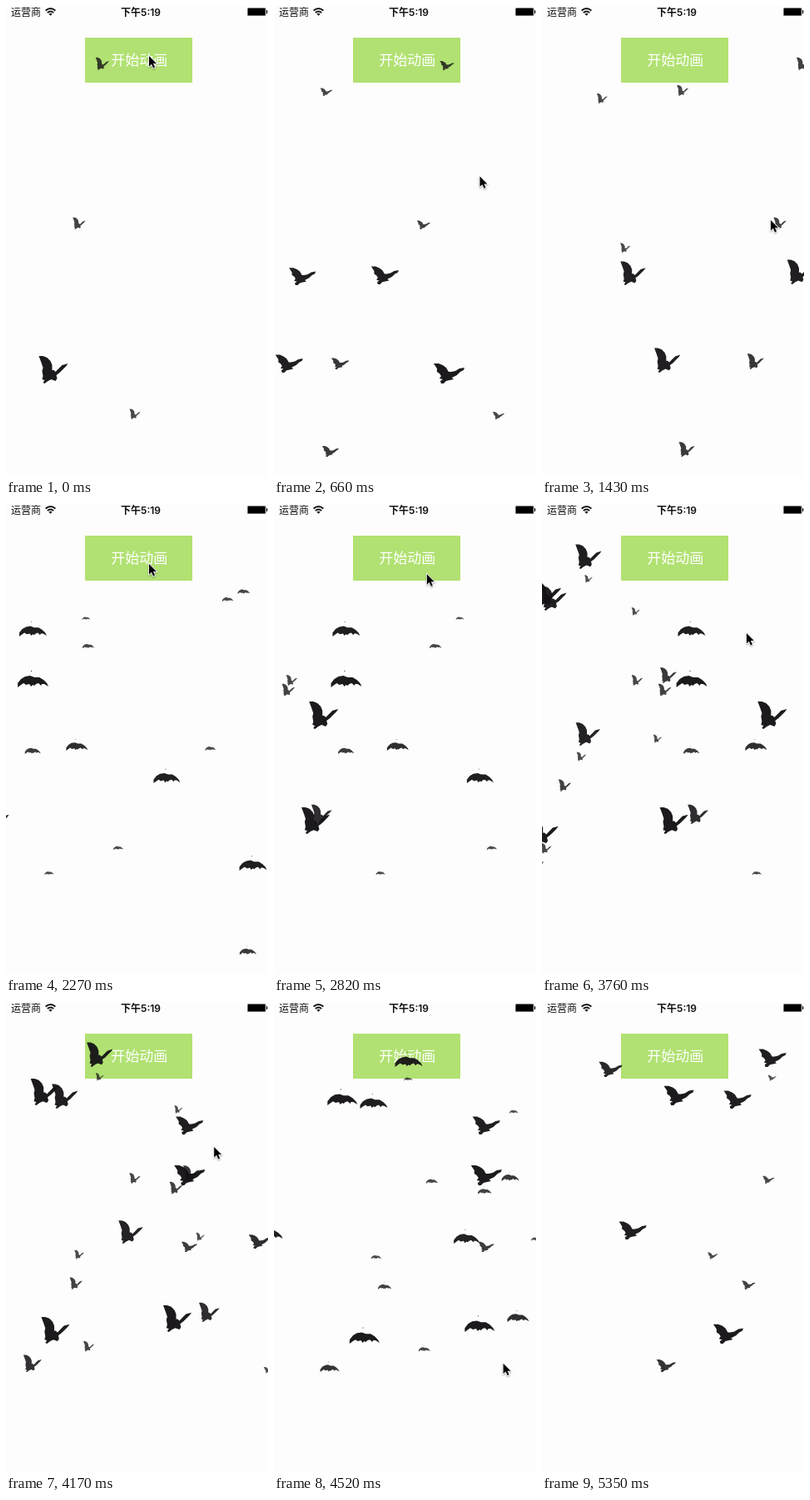
Recreate the animation shown at these times as an HTML page with a canvas. Size 315 px wide and 564 px high, loop 5.55 s.

```html
<!DOCTYPE html>
<html lang="zh">
<head>
<meta charset="utf-8">
<title>开始动画</title>
<style>
  html, body { margin: 0; width: 100%; height: 100%; overflow: hidden; background: #fdfdfd; }
  svg, canvas { position: absolute; left: 0; top: 0; width: 315px; height: 564px; }
  text { font-family: Inter, "Noto Sans CJK SC", "Noto Sans CJK", sans-serif; }
</style>
</head>
<body>
<svg viewBox="0 0 315 564">
  <text x="6" y="11.5" font-size="12" fill="#111">运营商</text>
  <g fill="none" stroke="#111" stroke-width="1.9">
    <path d="M47.6 5.4Q53.5 .6 59.4 5.4"/>
    <path d="M49.8 8Q53.5 5 57.2 8"/>
  </g>
  <path d="M51.4 9.4Q53.5 7.9 55.6 9.4L53.5 11.8Z" fill="#111"/>
  <text x="162" y="11.5" font-size="12" font-weight="600" text-anchor="middle" fill="#111">下午5:19</text>
  <rect x="290" y="2" width="22.5" height="10" rx="1.5" fill="#777"/>
  <rect x="291" y="3" width="20.5" height="8" rx=".5"/>
  <path d="M313 5h1q1 2 0 4h-1z" fill="#222"/>
  <rect x="95" y="38" width="129" height="54" fill="#b1e172"/>
  <text x="160.3" y="71.2" font-size="17" text-anchor="middle" fill="#fff">开始动画</text>
</svg>
<canvas></canvas>
<script>
const LOOP = 5550, RATE = .99 / 1000, FLAP = .495;
const TRAVEL = 350, START_X = -20, UNIT = 37;

// Wing poses in flapping order; origin is the left edge at the bottom.
const poses = [
  "M0-33L5-33 10-31 14-27 16-22 16-16 18-16 20-14 24-18 28-22 35-24 33-21 29-17 25-13 21-10 22-6 20-3 15-5 11-3 7 0 5-1 7-4 4-5 5-9 4-15 5-19 3-25Z",
  "M0-24L6-24 11-22 15-19 18-14 21-14 26-15 31-18 37-19 36-16 32-14 28-10 24-8 22-7 24-5 19-4 15-3 12 0 9 0 8-3 11-5 7-6 9-9 7-12 4-14 4-18Z",
  "M0 0L0-5 4-10 9-13 15-14 20-12 26-12 31-9 35-5 37-1 32-4 29-4 28-2 25-5 22-4 20-2 18-3 16-1 14-4 10-3 7-5 4-3ZM16-20h1v1h-1Z"
].map(d => new Path2D(d));

function seeded(seed) {
  return () => (seed = (seed * 16807) % 2147483647) / 2147483647;
}

const bat = (secs, launch, y, size) => ({ secs, launch, y, size });

// Small far-off bats, launched at random between two times.
function distant(count, from, to, seed) {
  const rnd = seeded(seed);
  const between = (a, b) => a + (b - a) * rnd();
  return Array.from({ length: count }, () =>
    bat(1.5 + Math.floor(rnd() * 5) / 2, between(from, to), between(65, 475), between(9, 17)));
}

// Crossing seconds, launch second, bottom edge, size.
const flocks = [
  { phase: .315, bats: [
    bat(2.5, -.97, 77, 17), bat(2.5, -.77, 268, 16), bat(2, -1, 496, 14),
    bat(1.5, -.33, 453, 37), bat(1.5, 0, 334, 33), bat(1.5, .23, 436, 21),
    bat(2.5, .03, 541, 20), bat(3.5, .12, 335, 32), bat(2, .44, 440, 33),
    bat(3, 1.35, 296, 26), bat(3.5, 1.73, 159, 33), bat(3.5, 1.73, 220, 37),
    bat(3.5, 1.73, 300, 19), ...distant(7, 0, 1.75, 4211)
  ] },
  { phase: .68, bats: [
    bat(3, 2.19, 396, 36), bat(2.5, 2.24, 384, 26), bat(1.5, 2.45, 270, 37),
    bat(2, 2.74, 215, 21), bat(2.5, 3.18, 78, 33), bat(1.5, 3.4, 290, 31),
    bat(3.5, 3.46, 124, 36), bat(2.5, 3.48, 128, 33), bat(2.5, 3.56, 410, 36),
    bat(3.5, 3.61, 444, 23), bat(2.5, 4.38, 285, 33), bat(2.5, 4.57, 90, 28),
    ...distant(8, 2.35, 3.7, 9173)
  ] }
];

// Pointer stops: time, x, y.
const stops = [[0, 172, 60], [1000, 275, 257], [1450, 275, 257], [2050, 172, 72], [2650, 172, 72],
  [3300, 241, 144], [4100, 249, 162], [4800, 290, 580], [LOOP, 290, 580]];
const arrow = new Path2D("M0 0V15.500L3.700 12.200 6.300 18 8.800 17 6.300 11.300H11.200Z");

const canvas = document.querySelector("canvas");
const ctx = canvas.getContext("2d");
const dpr = window.devicePixelRatio || 1;
canvas.width = 315 * dpr;
canvas.height = 564 * dpr;

function place(x, y, scale) {
  ctx.setTransform(dpr * scale, 0, 0, dpr * scale, dpr * x, dpr * y);
}

function drawFlock({ phase, bats }, now) {
  const pose = poses[Math.floor((now / FLAP + phase) % 1 * poses.length)];
  ctx.fillStyle = "#151316";
  for (const { secs, launch, y, size } of bats) {
    if (now < launch) continue;
    const x = START_X + TRAVEL / secs * (now - launch);
    ctx.globalAlpha = Math.min(.97, .66 + .33 * size / UNIT);
    place(x - size * .48, y, size / UNIT);
    ctx.fill(pose);
  }
  ctx.globalAlpha = 1;
}

function pointerAt(t) {
  const i = stops.findIndex(s => s[0] > t);
  const [t0, x0, y0] = stops[i - 1], [t1, x1, y1] = stops[i];
  const f = (t - t0) / (t1 - t0);
  const k = f * f * (3 - 2 * f);
  return [x0 + (x1 - x0) * k, y0 + (y1 - y0) * k];
}

function drawPointer(t) {
  place(...pointerAt(t), .8);
  ctx.shadowColor = "rgba(0,0,0,.35)";
  ctx.shadowBlur = 2 * dpr;
  ctx.shadowOffsetY = dpr;
  ctx.strokeStyle = "#fff";
  ctx.lineWidth = 2;
  ctx.stroke(arrow);
  ctx.shadowColor = "transparent";
  ctx.fillStyle = "#000";
  ctx.fill(arrow);
}

function draw() {
  const t = performance.now() % LOOP;
  place(0, 0, 1);
  ctx.clearRect(0, 0, 315, 564);
  flocks.forEach(flock => drawFlock(flock, t * RATE));
  drawPointer(t);
  requestAnimationFrame(draw);
}
draw();
</script>
</body>
</html>
```
